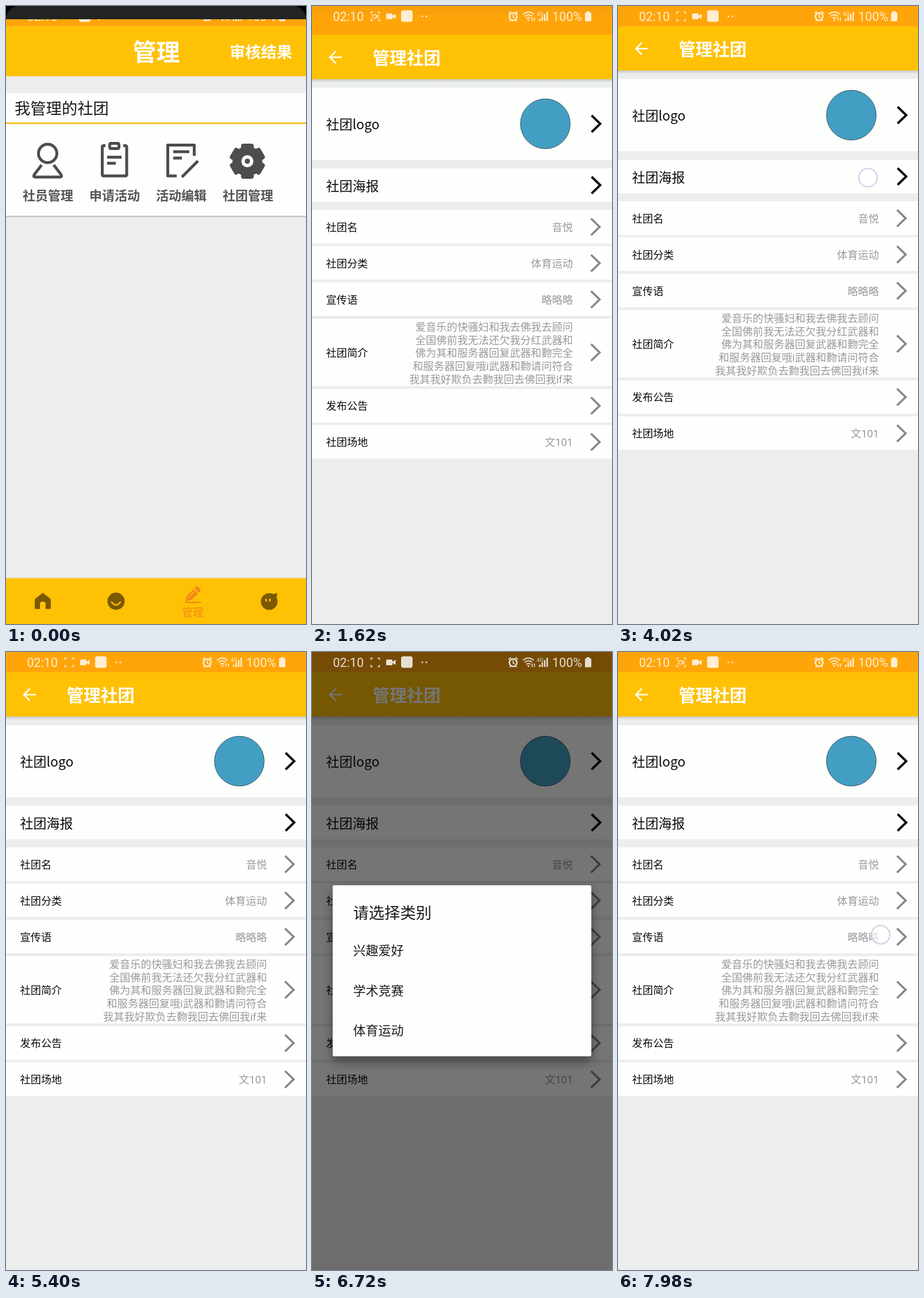
These frames come from a looping animation (522x1073 px, 8 s). An HTML page:

```html
<!DOCTYPE html>
<html lang="zh-CN">
<head>
<meta charset="utf-8">
<title>社团管理</title>
<style>
html, body { margin: 0; width: 100%; height: 100%; overflow: hidden; background: #000; }
svg { display: block; width: 522px; height: 1073px; font-family: Roboto, "Noto Sans CJK SC", "Noto Sans CJK", sans-serif; }
.cjk { font-family: "Noto Sans CJK SC", "Noto Sans CJK", sans-serif; }
</style>
</head>
<body>
<svg id="stage" viewBox="0 0 522 1073" xmlns="http://www.w3.org/2000/svg"></svg>
<script>
const LOOP = 8000, STEP = 60;
const BAR = '#ffc103', TOP = '#ffa50a', BG = '#eceeed', CARD = '#fdfffd';
const INK = '#4d4d4b', NAV = '#7b5903', HOT = '#f08a1c';

// Text placed by the vertical centre of its Chinese glyphs
const text = (x, cy, size, str, fill = '#0a0a0a', weight = 400, anchor = 'start') =>
  `<text x="${x}" y="${cy + size * 0.38}" font-size="${size}" fill="${fill}" font-weight="${weight}" text-anchor="${anchor}">${str}</text>`;
const rect = (x, y, w, h, fill, r = 0) =>
  `<rect x="${x}" y="${y}" width="${w}" height="${h}" fill="${fill}" rx="${r}"/>`;
const line = (d, color, width, extra = '') =>
  `<path d="${d}" fill="none" stroke="${color}" stroke-width="${width}" ${extra}/>`;
const dot = (x, y, r, fill, extra = '') => `<circle cx="${x}" cy="${y}" r="${r}" fill="${fill}" ${extra}/>`;
const group = (id, body, extra = '') => `<g id="${id}" ${extra}>${body}</g>`;

function homePage() {
  const round = 'stroke-linejoin="round"';
  const person = dot(72.5, 256, 16, 'none', `stroke="${INK}" stroke-width="5"`) +
    line('M62 276L49 293Q47 297 51 297H94Q98 297 96 293L83 276', INK, 5, round);
  const board = `<rect x="167.500" y="242.500" width="42.500" height="52.500" rx="2" fill="none" stroke="${INK}" stroke-width="5"/>` +
    rect(173, 235, 31, 14, CARD) +
    `<rect x="180.500" y="238.500" width="16" height="9" rx="2" fill="${CARD}" stroke="${INK}" stroke-width="5"/>` +
    line('M176 262.500H201M176 273H191', INK, 5);
  const edit = line('M327.500 260V241.500H281.500V295H297', INK, 5, round) +
    line('M306 297L334 269M291 253H319M291 264H306', INK, 5);
  const gear = [0, 60, 120].map(a =>
    `<rect x="409" y="239" width="22" height="61" rx="4" fill="${INK}" transform="rotate(${a} 420 269.500)"/>`).join('') +
    dot(420, 269.5, 26, INK) + dot(420, 269.5, 10.5, CARD) + dot(420, 269.5, 4.5, INK);
  const labels = ['社员管理', '申请活动', '活动编辑', '社团管理'].map((s, i) =>
    text(73 + i * 116, 328.5, 22, s, '#555553', 700, 'middle')).join('');

  const house = `<path d="M64 1019L76 1028Q78 1030 78 1032V1045Q78 1047 76 1047H69V1038Q69 1034 64 1034T59 1038V1047H52Q50 1047 50 1045V1032Q50 1030 52 1028Z" fill="${NAV}"/>`;
  const smile = dot(191.5, 1033.5, 15, NAV) + line('M184 1035Q191.500 1045 199 1035', BAR, 2.5, 'stroke-linecap="round"');
  const face = dot(458, 1034, 14.5, NAV) + `<path d="M458 1022Q465 1022 472 1019Q472 1025 469 1030Z" fill="${NAV}"/>` +
    line('M452.500 1029V1034M459 1029V1034', BAR, 2.5);
  const pencil = `<path d="M312 1034L315 1024L326 1013L334 1021L323 1031Z" fill="${HOT}"/>` +
    `<path d="M328 1011L331 1008Q333 1007 335 1009L338 1012Q339 1014 338 1016L335 1019Z" fill="${HOT}"/>` +
    line('M318 1026L327 1017', BAR, 1.5) + line('M311 1035.500H339', HOT, 2.5);

  return rect(0, 0, 522, 1073, BG) + rect(0, 0, 522, 35.5, TOP) + rect(0, 35.5, 522, 86.5, BAR) +
    text(261.5, 79.5, 41, '管理', '#fff', 700, 'middle') +
    text(443.5, 79.5, 27.3, '审核结果', '#fff', 700, 'middle') +
    rect(0, 151, 522, 51, CARD) + text(15, 178, 27.3, '我管理的社团', '#1a1a1a') +
    rect(0, 202, 522, 3, '#f5c62c') + rect(0, 205, 522, 159, CARD) + rect(0, 364, 522, 3, '#cbcccb') +
    person + board + edit + gear + labels +
    rect(0, 992, 522, 1.5, '#dedcd2') + rect(0, 993.5, 522, 79.5, BAR) + house + smile + pencil + face +
    text(325, 1053, 19, '管理', HOT, 400, 'middle');
}

function clubPage() {
  const cards = [[127, 125], [267, 58], [339, 58.5], [402, 58], [465, 58], [528, 117], [650, 58], [712.5, 58]]
    .map(([y, h]) => rect(0, y, 522, h, CARD)).join('');
  const arrow = (x, cy, color, w) => line(`M${x} ${cy - 14.5}L${x + 15} ${cy}L${x} ${cy + 14.5}`, color, w);
  const rows = [['社团名', 369, '音悦'], ['社团分类', 432, '体育运动'], ['宣传语', 495, '略略略'],
    ['社团简介', 587, ''], ['发布公告', 679.5, ''], ['社团场地', 742.5, '文101']]
    .map(([name, y, value]) => text(24.5, y, 18.2, name) +
      text(454, y, 18.3, value, '#999', 400, 'end') + arrow(485.5, y - 0.5, '#878787', 3.6)).join('');
  const intro = ['爱音乐的快骚妇和我去佛我去顾问', '全国佛前我无法还欠我分红武器和', '佛为其和服务器回复武器和覅完全',
    '和服务器回复哦i武器和覅请问符合', '我其我好欺负去覅我回去佛回我if来']
    .map((s, i) => text(454, 542 + i * 22.7, 18.3, s, '#999', 400, 'end')).join('');

  return rect(0, 0, 522, 1073, BG) + rect(0, 112, 522, 6, 'url(#under)') +
    rect(0, 0, 522, 35, TOP) + rect(0, 35, 522, 77, BAR) +
    line('M52 74H32M41.500 63.500L31 74L41.500 84.500', '#fff', 2.6) +
    text(105.5, 74.5, 29.6, '管理社团', '#fff', 700) + cards +
    group('names', text(24.5, 190, 23, '社团logo') + text(24.5, 297, 23, '社团海报'), 'class="cjk"') +
    dot(406, 189.5, 43.3, '#429fc3', 'stroke="#39505a" stroke-width="1"') +
    arrow(486.5, 189.5, '#111', 4) + arrow(486.5, 296, '#111', 4) + rows + intro;
}

function dialog() {
  const items = ['兴趣爱好', '学术竞赛', '体育运动'].map((s, i) => text(71.5, 518 + i * 69.5, 22, s, '#1c1c1c')).join('');
  return `<rect x="36" y="405" width="450" height="297" rx="3" fill="${CARD}" filter="url(#drop)"/>` +
    text(71.5, 453, 27.3, '请选择类别', '#1c1c1c') + items;
}

function statusBar() {
  const w = '#fff';
  const camera = rect(0, 13, 11, 10, w, 1.5) + `<path d="M11 17L16.500 13.500V22.500L11 19Z" fill="${w}"/>`;
  const recording = line('M102.500 14V10.500H106M114 10.500H117.500V14M117.500 22V25.500H114M106 25.500H102.500V22', w, 1.5) +
    group('blink', `<rect x="105.500" y="15" width="6" height="6" fill="none" stroke="${w}" stroke-width="1.300"/>` +
      line('M112 18L115 15.500V20.500Z', w, 1.2)) +
    `<g transform="translate(129 0)">${camera}</g>` + rect(155, 7.5, 20, 20, w, 4) +
    dot(192, 18, 1.5, w) + dot(199, 18, 1.5, w);
  const idle = rect(127, 7.5, 20, 20, w, 4) + `<path d="M158 18L167 13L162 26Z" fill="${w}"/>`;
  const alarm = dot(350, 18.5, 6.5, 'none', `stroke="${w}" stroke-width="2.600"`) +
    line('M350 14.500V19L353 21M342 13L346 9.500M358 13L354 9.500M344 26.500L346 24M356 26.500L354 24', w, 1.8);
  const wifi = line('M367 14.500Q376.500 6.500 386 14.500M370 18Q376.500 12.500 383 18M373 21.500Q376.500 18.500 380 21.500', w, 1.9) +
    dot(376.5, 24.5, 1.6, w) + line('M383 20V26M387 20V26', w, 1.6);
  const bars = [0, 1, 2, 3].map(i => rect(395 + i * 4.3, 22 - i * 4, 2.6, 4 + i * 4, w)).join('');
  return `<text x="36.500" y="26" font-size="21.500" fill="${w}">02:10</text>` +
    group('recording', recording) + group('idle', idle) + alarm + wifi + bars +
    `<text x="391" y="17" font-size="9.500" fill="${w}">4G</text>` +
    `<text x="418" y="26" font-size="21.500" fill="${w}">100%</text>` +
    rect(475, 11, 11, 15.5, w, 1.5) + rect(478, 9, 5, 3, w);
}

const stage = document.getElementById('stage');
stage.innerHTML = `<defs>
  <linearGradient id="under" x2="0" y2="1"><stop stop-color="#c6c9ca"/><stop offset="1" stop-color="${BG}"/></linearGradient>
  <filter id="drop" x="-10%" y="-10%" width="120%" height="125%"><feDropShadow dx="0" dy="9" stdDeviation="9" flood-opacity=".42"/></filter>
</defs>` +
  group('home', homePage()) + group('shadeIn', rect(0, 0, 522, 1073, '#000')) + group('club', clubPage()) +
  group('dim', rect(0, 0, 522, 1073, '#000')) + group('dialog', dialog()) +
  group('status', statusBar(), 'opacity=".82"') +
  group('shade', rect(0, -30, 522, 53, '#000') + '<path d="M0 23V22Q2 2 22 0H500Q520 2 522 22V23Z" fill="#222423"/>') +
  group('touch', dot(0, 0, 18, 'none', 'stroke="#fff" stroke-width="2" opacity=".2"') +
    dot(0, 0, 16, '#fff', 'fill-opacity=".68" stroke="#c6c7e6" stroke-width="2.200" stroke-opacity=".85"'));

const el = {};
for (const g of stage.querySelectorAll('g[id]')) el[g.id] = g;

// Tables of [time, value], linear between points
const tracks = {
  shade: [[0, 0], [60, -12], [120, -24]],
  rise: [[1320, 520], [1380, 400], [1440, 240], [1500, 110], [1560, 45], [1620, 15], [1680, 4], [1740, 0]],
  fade: [[1320, 0], [1380, .15], [1440, .45], [1500, .78], [1560, 1]],
  shift: [[1380, 0], [1440, -1]],
  dark: [[1320, 0], [1440, .025]],
  dim: [[6480, 0], [6540, .12], [6600, .3], [6660, .45], [6720, .54], [6780, .57], [7200, .57], [7260, .45], [7320, .27], [7380, .1], [7440, 0]],
  dialog: [[6480, 0], [6540, .25], [6600, .65], [6660, 1], [7200, 1], [7260, .45], [7320, .04], [7380, 0]]
};
// x, y, press, release
const taps = [[420, 295, 1140, 1260], [430, 195, 2940, 3060], [435, 298, 3960, 4260], [421, 372, 5460, 5820],
  [425, 432, 6360, 6420], [448, 775, 7200, 7320], [457, 491, 7860, 8000]];
const blinks = [1140, 1440, 1920, 2280, 2700, 3120, 3720, 4140, 4620, 4980, 5400, 5880, 6360, 6780, 7020, 7440, 7620, 7860];

function at(name, t) {
  const keys = tracks[name];
  if (t <= keys[0][0]) return keys[0][1];
  for (let i = 1; i < keys.length; i++) {
    const [a, u] = keys[i - 1], [b, v] = keys[i];
    if (t <= b) return u + (v - u) * (t - a) / (b - a);
  }
  return keys[keys.length - 1][1];
}

const move = (g, x, y) => g.setAttribute('transform', `translate(${x} ${y})`);
const alpha = (g, a) => {
  g.setAttribute('opacity', a);
  g.setAttribute('visibility', a > 0 ? 'visible' : 'hidden');
};

function draw(time) {
  const t = Math.floor(time % LOOP / STEP) * STEP;
  move(el.shade, 0, at('shade', t));
  alpha(el.shade, t < 120 ? 1 : 0);
  move(el.home, 0, at('shift', t));
  alpha(el.shadeIn, at('dark', t));
  move(el.club, 0, at('rise', t));
  alpha(el.club, at('fade', t));
  alpha(el.dim, at('dim', t));
  alpha(el.dialog, at('dialog', t));

  const live = t >= 360;
  alpha(el.idle, live ? 0 : 1);
  alpha(el.recording, live ? 1 : 0);
  alpha(el.blink, live && blinks.filter(b => b <= t).length % 2 === 0 ? 1 : 0);

  const tap = taps.find(p => t >= p[2] && t < p[3] + 120);
  if (tap) move(el.touch, tap[0], tap[1]);
  alpha(el.touch, tap ? Math.min(1, 1 - (t - tap[3]) / 120) : 0);
}

const start = performance.now();
function tick() {
  draw(performance.now() - start);
  requestAnimationFrame(tick);
}
tick();
</script>
</body>
</html>
```
